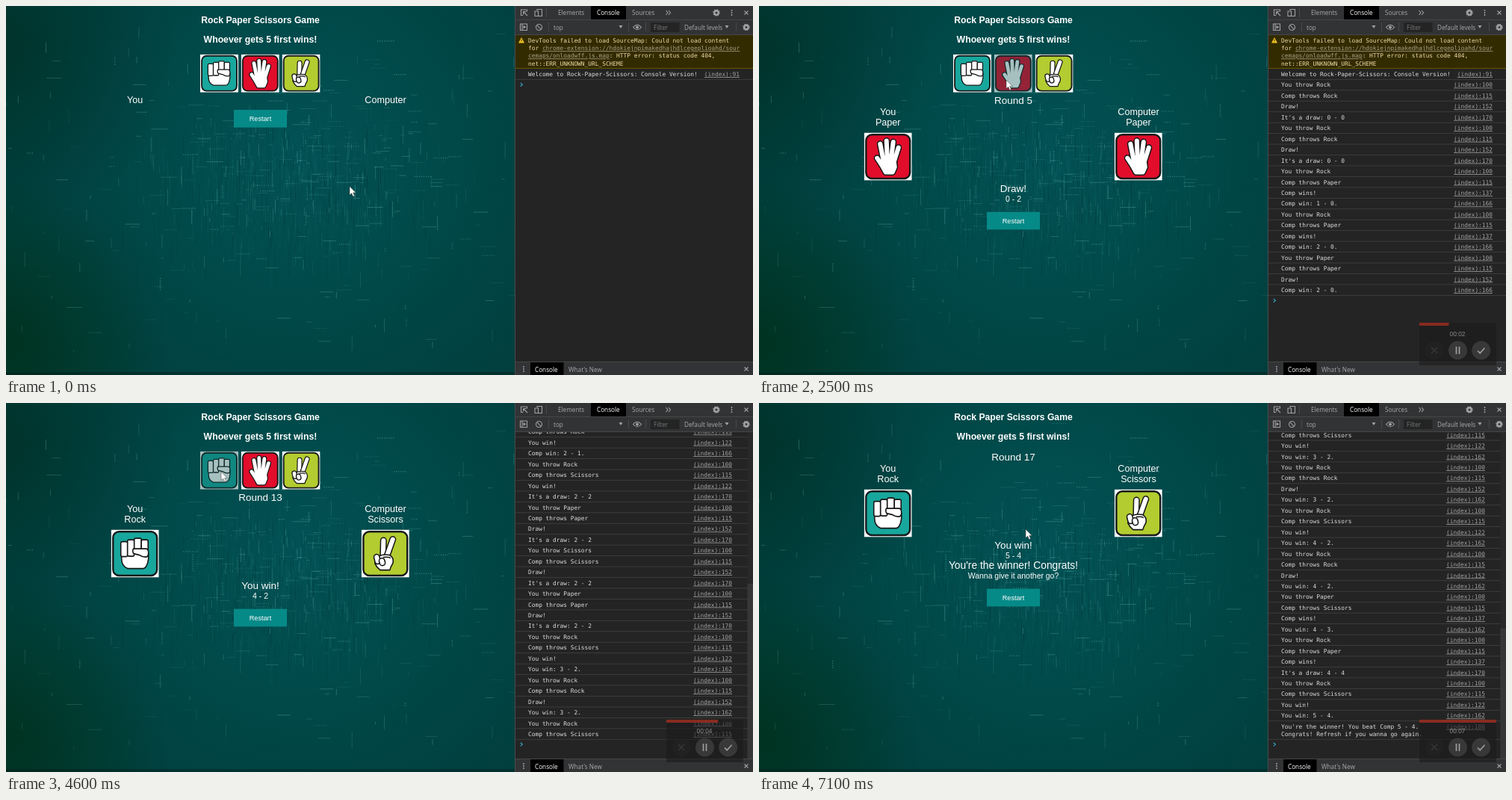
Recreate the animation shown at these times as an HTML page with a canvas. Size 1000 by 494 pixels, loop 7300 ms.

```html
<!DOCTYPE html>
<html lang="en">
<head>
<meta charset="utf-8">
<title>Rock Paper Scissors Game</title>
<style>
html, body { margin: 0; width: 100%; height: 100%; overflow: hidden; background: #242424; }
canvas, svg { position: absolute; left: 0; top: 0; display: block; }
.page { font-family: "Liberation Sans", Arial, sans-serif; fill: #fff; text-anchor: middle; }
.ui { font: 8.2px "Open Sans", "Noto Sans", sans-serif; fill: #a9aaac; }
.log { font: 7.85px "DejaVu Sans Mono", monospace; fill: #dcdcdc; }
.log .ref { text-anchor: end; fill: #a2a2a2; text-decoration: underline; }
.icon { fill: none; stroke: #a0a1a3; stroke-width: 1.1; }
.ink { fill: #fff; stroke: #161616; stroke-width: 1.6; stroke-linejoin: round; }
.limb { fill: none; stroke-linecap: round; stroke-linejoin: round; }
</style>
</head>
<body>
<canvas id="bg" width="681" height="494"></canvas>
<svg width="1000" height="494" viewBox="0 0 1000 494">
  <defs id="defs">
    <clipPath id="view"><rect x="682" y="39" width="318" height="437"/></clipPath>
  </defs>
  <rect x="681" width="319" height="494" fill="#242424"/>
  <g id="console" clip-path="url(#view)"></g>
  <g id="tools"></g>
  <g id="page" class="page"></g>
  <g id="recorder" opacity=".82"></g>
  <path id="cursor" d="M0 0V11.6L2.7 9.2L4.6 13.6L6.6 12.7L4.7 8.4H8.3Z" fill="#fff" stroke="#333" stroke-width=".5"/>
</svg>
<script>
const LOOP = 7300;
const $ = id => document.getElementById(id);

// ---------- backdrop ----------
function paintBackdrop() {
  const c = $('bg').getContext('2d');
  let seed = 77;
  const rnd = () => (seed = (seed * 16807) % 2147483647) / 2147483647;
  const bell = () => (rnd() + rnd() + rnd()) / 1.5 - 1;
  const glow = (x, y, r, from, to) => {
    const g = c.createRadialGradient(x, y, 0, x, y, r);
    g.addColorStop(0, from);
    g.addColorStop(1, to);
    c.fillStyle = g;
    c.fillRect(0, 0, 681, 494);
  };
  glow(390, 200, 450, '#025255', '#003d3a');
  glow(0, 450, 220, 'rgba(0,44,16,.6)', 'rgba(0,44,16,0)');
  glow(0, 60, 230, 'rgba(0,40,28,.5)', 'rgba(0,40,28,0)');

  // fine vertical grain around the middle
  for (let i = 0; i < 800; i++) {
    const x = 380 + bell() * 270, y = 235 + bell() * 140;
    c.fillStyle = `rgba(${rnd() < .6 ? '0,34,38' : '50,140,135'},${.05 + rnd() * .1})`;
    c.fillRect(Math.round(x / 3) * 3, y, 1, 8 + rnd() * 30);
  }
  // circuit streaks, some dotted
  for (let i = 0; i < 460; i++) {
    const wide = rnd() < .35;
    const x = wide ? rnd() * 680 : 390 + bell() * 290;
    const y = wide ? 20 + rnd() * 450 : 225 + bell() * 165;
    const len = 3 + rnd() * 20, across = rnd() < .5;
    c.fillStyle = `rgba(120,205,198,${.08 + rnd() * .28})`;
    if (rnd() < .3) {
      for (let d = 0; d < len; d += 3) c.fillRect(x + (across ? d : 0), y + (across ? 0 : d), 1.4, 1.4);
    } else {
      c.fillRect(x, y, across ? len : .8, across ? .8 : len);
    }
  }
  c.fillStyle = 'rgba(0,20,20,.35)';
  c.fillRect(0, 490, 681, 4);
}

// ---------- shapes ----------
const text = (x, y, s, size, extra = '') => `<text x="${x}" y="${y}" font-size="${size}" ${extra}>${s}</text>`;
const label = (x, y, s, fill = '') => `<text class="ui" x="${x}" y="${y}" ${fill && `style="fill:${fill}"`}>${s}</text>`;
const box = (x, y, w, h, fill, extra = '') => `<rect x="${x}" y="${y}" width="${w}" height="${h}" fill="${fill}" ${extra}/>`;
const icon = d => `<path class="icon" d="${d}"/>`;
// outlined fingers that merge where they overlap
const limbs = d => `<path class="limb" d="${d}" stroke="#161616" stroke-width="9"/><path class="limb" d="${d}" stroke="#fff" stroke-width="6"/>`;

const HANDS = {
  Rock: ['#18a79d', `<g class="ink"><path d="M14 32H50V39C49 47 46 52 43 52H22C17 50 14 45 14 39Z"/>
    <rect x="13" y="16" width="9" height="20" rx="2"/><rect x="22" y="13.500" width="9" height="22" rx="2"/>
    <rect x="31" y="11.500" width="9.500" height="18" rx="2"/><rect x="40.500" y="13.500" width="9" height="16" rx="2"/>
    <path d="M30 25.500H47Q50 26 50 31T47 36.500Q42 37 38 34L30 32Q28 28 30 25.500Z"/></g>`],
  Paper: ['#e20d2b', limbs('M26 38L21.500 15M31 35L30 11M36 36L39 12.500M40 39L46 20M26 47L17.500 34' +
    'M26 38L40 39L41 46L38 53H29L24 44Z') + '<path d="M25 37H41L42 47L38 53H29L24 45Z" fill="#fff"/>'],
  Scissors: ['#b3cc30', limbs('M29 37L29.500 14.500') + limbs('M33.500 37L42 13') +
    `<g class="ink"><path d="M21 37Q28 32 38 34Q44 38 42 45Q39 50 38 54H25Q20 50 18 45Z"/>
    <rect x="17.500" y="33" width="7.500" height="13" rx="3.700" transform="rotate(-14 21 40)"/>
    <rect x="24" y="38" width="7.500" height="10" rx="3.700" transform="rotate(-14 28 43)"/></g>
    <path d="M29 37Q36 36 39 38" class="ink" fill="none"/>`]
};
const NAMES = Object.keys(HANDS);
$('defs').innerHTML += NAMES.map(n => `<symbol id="${n}" viewBox="0 0 64 64"><rect width="64" height="64" fill="#fff"/>
  <rect x="2.600" y="2.600" width="58.800" height="58.800" rx="8" fill="${HANDS[n][0]}" stroke="#151a1a" stroke-width="2.400"/>${HANDS[n][1]}</symbol>`).join('');
const hand = (n, x, y, size, alpha = 1) => `<use href="#${n}" x="${x}" y="${y}" width="${size}" height="${size}" opacity="${alpha}"/>`;

// ---------- developer tools chrome ----------
function paintTools() {
  const cross = (x, y) => icon(`M${x - 2.5} ${y - 2.5}l5 5m0-5l-5 5`);
  const dots = (x, y) => [-3, 0, 3].map(d => `<circle cx="${x}" cy="${y + d}" r=".9" fill="#a9aaac"/>`).join('');
  const gear = (x, y) => `<circle class="icon" cx="${x}" cy="${y}" r="2.7" stroke-width="2" style="stroke-width:2.400"/>
    <circle class="icon" cx="${x}" cy="${y}" r="4.200" stroke-dasharray="1.65 1.65"/>`;
  const drop = (x, y) => `<path d="M${x - 2.5} ${y - 2}h5l-2.500 4z" fill="#a0a1a3"/>`;
  const rule = (x, y) => box(x, y, 1, 12, '#4a4a4a');
  $('tools').innerHTML =
    box(681, 0, 319, 38, '#323335') + box(681, 18, 319, 1, '#454648') + box(681, 38, 319, 1, '#454648') +
    box(783, 0, 47, 18, '#000') + box(681, 476, 319, 18, '#323335') + box(681, 476, 319, 1, '#454648') +
    box(702, 477, 44.5, 17, '#000') + box(681, 0, 1, 494, '#4a4b4c') +
    icon('M692 12.500H689.500V5H697.500V7.500M692.500 7.500L698 13M692.500 7.500v4m0-4h4') +
    icon('M711 6V4.500H717.500V13.500H713M708 7h4.500v6.500H708z') + rule(723, 3) +
    label(739, 12, 'Elements') + label(791, 12, 'Console', '#fff') + label(838, 12, 'Sources') +
    icon('M883.500 6l2.500 3-2.500 3M887 6l2.500 3-2.500 3') +
    gear(951, 9) + dots(971.5, 9) + cross(991, 9) +
    icon('M688.500 24h9v8.500h-9zM691 24v8.500') + '<path d="M692.500 26l4 2.300-4 2.300z" fill="#a0a1a3"/>' +
    '<circle class="icon" cx="713.500" cy="28.500" r="4"/>' + icon('M710.700 25.700l5.600 5.600') + rule(726, 22) +
    label(733, 31.5, 'top') + drop(823, 28) + rule(833, 22) +
    icon('M839.500 28.500Q845 22 850.500 28.500Q845 35 839.500 28.500Z') + '<circle cx="845" cy="28.500" r="2" fill="#a0a1a3"/>' +
    rule(856, 22) + box(863, 22, 38.5, 13, '#242424') + label(867, 31.5, 'Filter', '#77787a') +
    label(908, 31.5, 'Default levels') + drop(965, 28) + rule(977, 22) + gear(991, 28.5) +
    dots(693, 486) + label(708, 489.5, 'Console', '#fff') + label(753, 489.5, "What's New") + cross(991, 486);
}

// ---------- game ----------
// start time, your throw, computer's throw
const ROUNDS = [
  [500, 'R', 'R'], [1200, 'R', 'R'], [1600, 'R', 'P'], [1950, 'R', 'P'], [2200, 'P', 'P'], [2700, 'P', 'R'],
  [3000, 'R', 'S'], [3500, 'P', 'P'], [3700, 'S', 'S'], [3900, 'P', 'P'], [4100, 'R', 'S'], [4300, 'R', 'R'],
  [4500, 'R', 'S'], [4750, 'R', 'R'], [5150, 'P', 'S'], [5550, 'R', 'P'], [6100, 'R', 'S']
];
const full = k => NAMES.find(n => n[0] === k);
let mine = 0, theirs = 0;
const game = ROUNDS.map(([at, a, b]) => {
  const win = 'RS PR SP'.includes(a + b), draw = a === b;
  // paper against scissors goes to the computer, like any other loss
  if (win) mine++; else if (!draw) theirs++;
  const [result, ref] = draw ? ['Draw!', 152] : win ? ['You win!', 122] : ['Comp wins!', 137];
  const [status, statusRef] = mine === theirs ? [`It's a draw: ${mine} - ${theirs}`, 170] :
    mine > theirs ? [`You win: ${mine} - ${theirs}.`, 162] : [`Comp win: ${theirs} - ${mine}.`, 166];
  return {
    at, you: full(a), comp: full(b), result, score: `${mine} - ${theirs}`,
    rows: [['You throw ' + full(a), 100], ['Comp throws ' + full(b), 115], [result, ref], [status, statusRef]]
  };
});
game[16].rows.push(["You're the winner! You beat Comp 5 - 4.|Congrats! Refresh if you wanna go again.", 180]);

// ---------- console ----------
const ROW = 14.45, WARN = 45, FLOOR = 450.4;
const rowHeight = s => s.includes('|') ? 24.6 : ROW;

function warning(y) {
  const u = 'text-decoration="underline" fill="#a9a089"';
  const lines = [
    'DevTools failed to load SourceMap: Could not load content',
    `for <tspan ${u}>chrome-extension://hdokiejnpimakedhajhdlcegeplioahd/sour</tspan>`,
    `<tspan ${u}>cemaps/onloadwff.js.map</tspan>: HTTP error: status code 404,`,
    'net::ERR_UNKNOWN_URL_SCHEME'
  ];
  return box(682, y, 318, WARN, '#332b00') + box(682, y + WARN - 1, 318, 1, '#655500') +
    `<path d="M690 ${y + 3}l4 7.500h-8z" fill="#f2c327"/>` + box(689.6, y + 5.5, .9, 3, '#332b00') +
    lines.map((s, i) => `<text x="699" y="${y + 10.2 + i * 10.1}" style="fill:#ecd9a6">${s}</text>`).join('');
}

function drawConsole(t) {
  let rows = [['Welcome to Rock-Paper-Scissors: Console Version!', 91]];
  for (const g of game) {
    if (t >= g.at) rows.push(...g.rows.slice(0, 1 + Math.floor((t - g.at) / 100)));
  }
  const total = () => WARN + rows.reduce((h, r) => h + rowHeight(r[0]), 0);
  const scrolled = 39 + total() > FLOOR;
  if (scrolled) rows[0] = ['Welcome to Rock-Paper-Scissors: Console|Version!', 91];
  let y = scrolled ? FLOOR - total() : 39;
  let out = warning(y);
  y += WARN;
  for (const [s, ref] of rows) {
    const h = rowHeight(s);
    if (y + h > 38) {
      out += s.split('|').map((line, i) => `<text x="699" y="${y + 10 + i * 10.1}">${line}</text>`).join('') +
        `<text class="ref" x="${scrolled ? 972 : 982}" y="${y + 10}">(index):${ref}</text>` +
        box(682, y + h - .5, scrolled ? 311 : 318, .8, '#414141');
    }
    y += h;
  }
  out += `<path d="M688.700 ${y + 4.4}l2.600 2.300-2.600 2.300" fill="none" stroke="#36a5c4" stroke-width="1.2"/>`;
  if (scrolled) {
    const all = total() + 26, size = 437 * 437 / all;
    out += box(993, 39, 7, 437, '#292929') + box(993, 476 - size, 6.5, size, '#363636', 'stroke="#444" stroke-width=".6"');
  }
  $('console').innerHTML = `<g class="log">${out}</g>`;
}

// ---------- page ----------
// time, x, y of the pointer tip
const PATH = [
  [0, 460, 241.5], [200, 460, 241.5], [400, 395, 180], [600, 310, 108], [800, 292, 86], [2100, 294, 88], [2300, 318, 95],
  [2500, 331, 99], [2700, 331, 99], [2900, 300, 95], [3100, 300, 95], [3300, 384, 93], [3600, 345, 95], [3800, 385, 92],
  [4000, 342, 95], [4200, 292, 92], [4600, 288, 92], [4900, 288, 92], [5200, 335, 95], [5600, 299, 85], [6100, 299, 86],
  [6500, 335, 145], [6900, 357, 169], [7300, 357, 169]
];
function pointer(t) {
  const i = Math.max(1, PATH.findIndex(p => p[0] >= t));
  const [t0, x0, y0] = PATH[i - 1], [t1, x1, y1] = PATH[i];
  const k = Math.max(0, (t - t0) / (t1 - t0));
  return [x0 + (x1 - x0) * k, y0 + (y1 - y0) * k];
}

function drawPage(t) {
  const round = game.filter(g => t >= g.at).length, g = game[round - 1];
  const over = round === game.length, dy = over ? -54 : 0;
  const [hx, hy] = pointer(t - 100);
  let out = text(340.5, 23, 'Rock Paper Scissors Game', 12.2, 'font-weight="bold"') +
    text(340.5, 49.2, 'Whoever gets 5 first wins!', 12.25, 'font-weight="bold"');
  if (!over) {
    NAMES.forEach((n, i) => {
      const x = 260 + i * 54.8;
      const hover = hx >= x && hx <= x + 51 && hy >= 65 && hy <= 116;
      out += hand(n, x, 64.7, 51, hover ? .65 : 1);
    });
  }
  const labelY = g ? 145.5 + dy : 130;
  out += text(172.7, labelY, 'You', 12.6) + text(508, labelY, 'Computer', 12.6);
  let by = 139;
  if (g) {
    by = over ? 248.7 : 275.7;
    out += text(340.5, 131 + dy, 'Round ' + round, 13.5) +
      text(172.7, 160 + dy, g.you, 12.6) + text(508, 160 + dy, g.comp, 12.6) +
      hand(g.you, 140.7, 169.6 + dy, 64) + hand(g.comp, 475.8, 169.6 + dy, 64) +
      text(340.5, 249 + dy, g.result, 13.5) + text(340.5, 261.8 + dy, g.score, 10.5);
    if (over) out += text(340.5, 222, "You're the winner! Congrats!", 13.8) + text(340.5, 234.6, 'Wanna give it another go?', 10.45);
  }
  out += box(305, by, 71, 23.6, '#068a88') + text(340.5, by + 15, 'Restart', 9.15);
  $('page').innerHTML = out;
  $('cursor').setAttribute('transform', `translate(${pointer(t).join()})`);
}

function drawRecorder(t) {
  if (t < 200) return $('recorder').innerHTML = '';
  const knob = (x, fill, d, ink) => `<circle cx="${x}" cy="461" r="12.500" fill="${fill}"/>
    <path d="${d}" fill="none" stroke="${ink}" stroke-width="1.7"/>`;
  const clock = '00:0' + Math.floor((t + 300) / 1000);
  $('recorder').innerHTML = box(884, 424, 103, 57, '#1b1b1b', 'opacity=".7"') + box(884, 424, 103, 4, '#202020', 'opacity=".7"') +
    box(884, 424, Math.min(103, 4 + t * .0142), 4, '#b3301f', 'opacity=".85"') +
    `<text x="935" y="441.800" font-size="8.300" class="page" style="fill:#a0a0a0">${clock}</text>` +
    knob(904, '#212121', 'M900 457l8 8m0-8l-8 8', '#393939') +
    knob(935.5, '#3d3d3d', 'M933.500 456v10M937.500 456v10', '#b8b8b8') +
    knob(966.700, '#3d3d3d', 'M962 461.500l3.200 3.200 6.300-7', '#b8b8b8');
}

function snap(t) {
  const p = t % 2300;
  const step = p < 1300 ? Math.min(1000, Math.floor(p / 200) * 200) : 1300 + Math.floor((p - 1300) / 200) * 200;
  return t - p + step;
}

let shown = -1;
function frame() {
  const t = snap(performance.now() % LOOP);
  if (t !== shown) {
    shown = t;
    drawConsole(t);
    drawPage(t);
    drawRecorder(t);
  }
  requestAnimationFrame(frame);
}
paintBackdrop();
paintTools();
frame();
</script>
</body>
</html>
```
